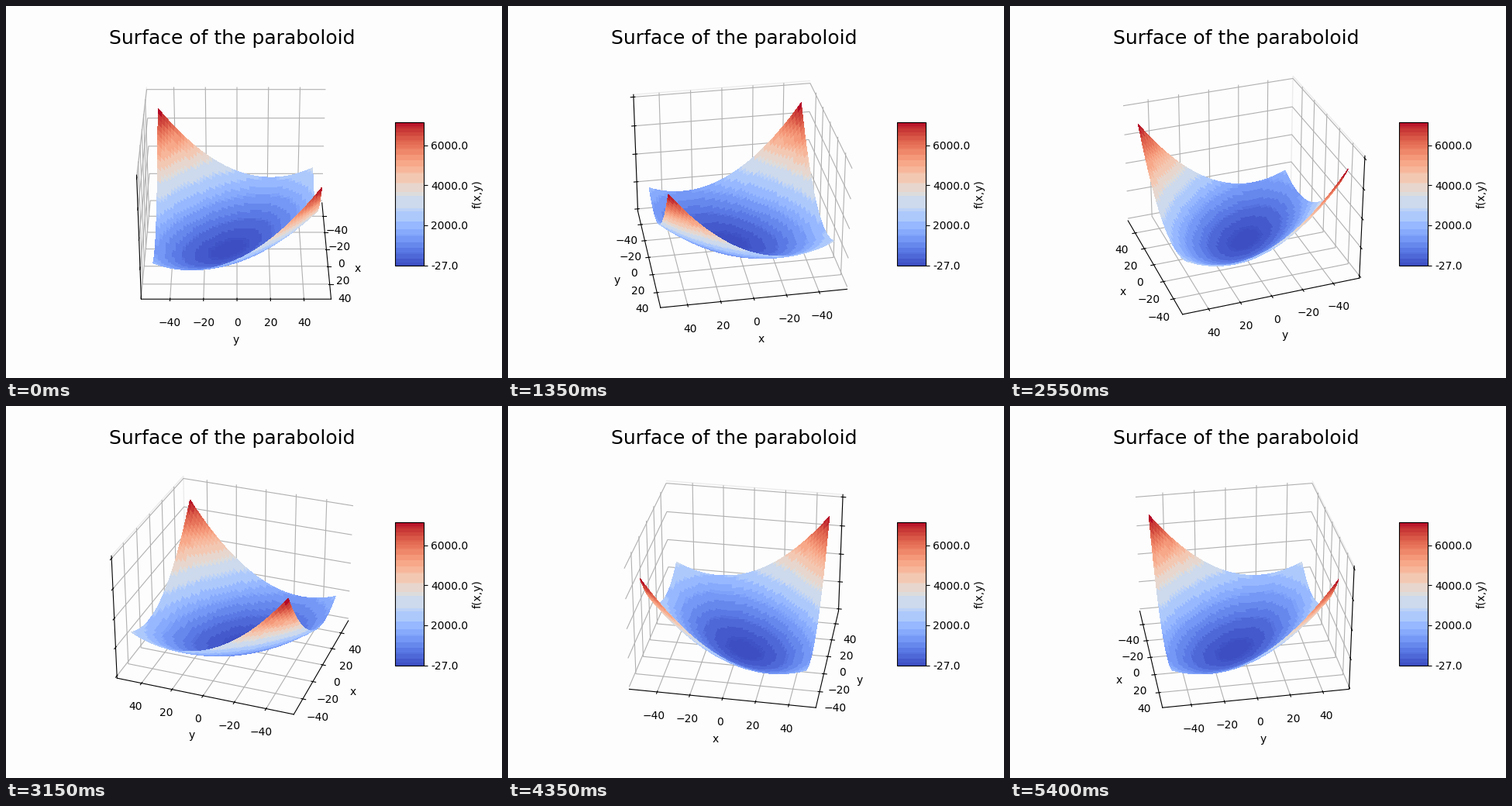
These frames come from a looping animation (640x480 px, 5550 ms). A matplotlib script:

```python
import matplotlib as mpl
import matplotlib.pyplot as plt
import numpy as np
from matplotlib.animation import FuncAnimation
from matplotlib.colors import ListedColormap

BG = "#fdfdfd"
FRAMES, INTERVAL = 37, 150


def banded(name, steps=(32, 16, 32)):
    """Merge neighbouring colours of a map into flat bands."""
    rgb = mpl.colormaps[name](np.arange(256))[:, :3]
    cells = (rgb * 255).astype(int) // np.array(steps)
    _, band = np.unique(cells, axis=0, return_inverse=True)
    band = band.ravel()
    return ListedColormap([rgb[band == b].mean(axis=0) for b in band])


def paraboloid(x, y):
    return x**2 + x * y + y**2 - 4 * x + 6 * y - 2


fig = plt.figure(figsize=(6.4, 4.8), dpi=100, facecolor=BG)
ax = fig.add_subplot(projection="3d", facecolor=BG)

x, y = np.meshgrid(np.arange(-50, 50), np.arange(-50, 50))
z = paraboloid(x, y)
low, high = z.min(), z.max() + 1000
surf = ax.plot_surface(x, y, z, cmap=banded("coolwarm"), vmin=low,
                       linewidth=0, antialiased=False)

ax.set_title("Surface of the paraboloid", fontsize=18)
ax.set_xlabel("x")
ax.set_ylabel("y")

# Five unlabelled heights, with the same small margin as the other axes.
ax.set_zticks(np.linspace(low, high, 5), labels=[""] * 5)
pad = (high - low) / 48
ax.set_zlim(low - pad, high + pad)

for axis in (ax.xaxis, ax.yaxis, ax.zaxis):
    axis.set_pane_color(mpl.colors.to_rgba(BG))
ax.yaxis.pane.set_edgecolor("#ececec")

fig.colorbar(surf, shrink=0.5, aspect=5, label="f(x,y)",
             ticks=[low, 2000, 4000, 6000], format="%.1f")


def update(i):
    # The opening view is held for two steps; the tiny offset
    # settles which wall is at the back when seen head-on.
    ax.view_init(30, 10 * max(i - 1, 0) or 1e-3)
    return [surf]


anim = FuncAnimation(fig, update, frames=FRAMES, interval=INTERVAL,
                     init_func=lambda: update(0), repeat=True, repeat_delay=0)
plt.show()
```
